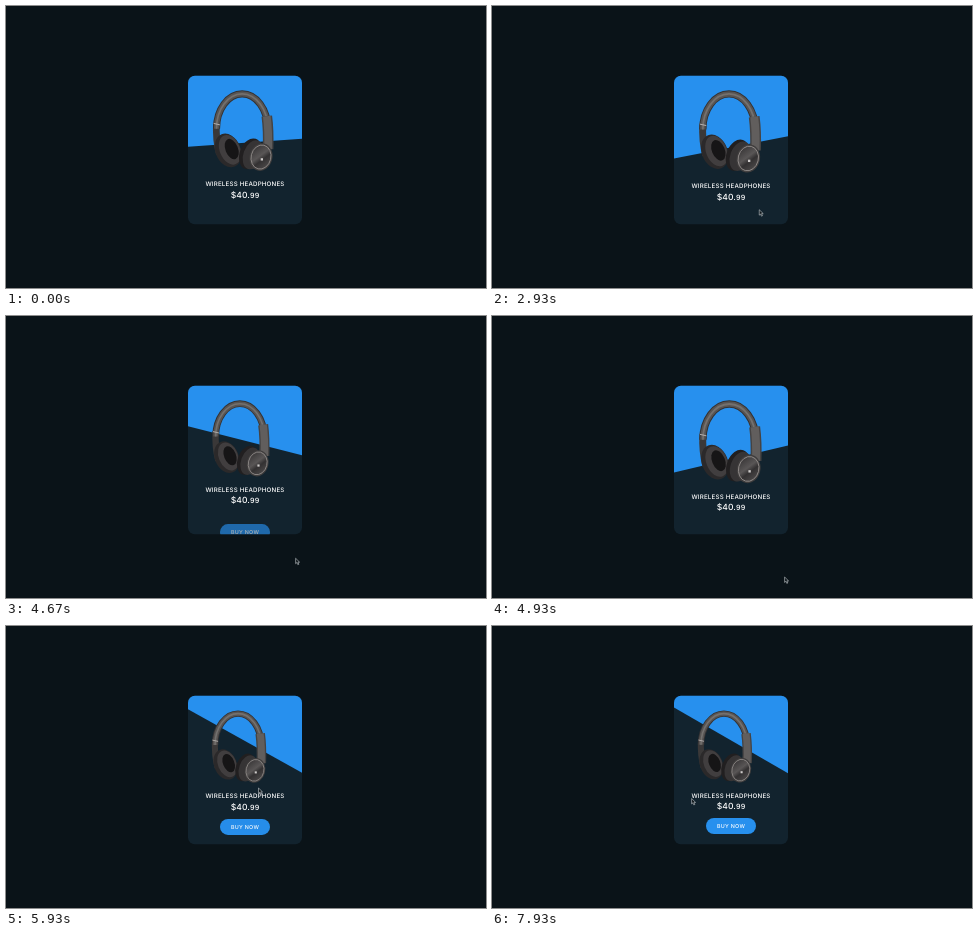
Animation, 480 px wide and 282 px high, one loop 8 s. Source, as an HTML page:

```html
<!DOCTYPE html>
<html lang="en">
<head>
<meta charset="utf-8">
<title>Product card</title>
<style>
  html, body { margin: 0; width: 100%; height: 100%; overflow: hidden; background: #0a1318; }
  svg { display: block; width: 100%; height: 100%; }
  text { font-family: Inter, "Open Sans", sans-serif; font-weight: 500; fill: #fff; text-anchor: middle; text-rendering: geometricPrecision; }
  .title { font-size: 6.2px; letter-spacing: .19px; }
  .price { font-size: 8.5px; letter-spacing: .1px; }
  .cents { font-size: 7.2px; }
  .label { font-size: 5.4px; letter-spacing: .27px; }
  .line { fill: none; }
</style>
</head>
<body>
<svg viewBox="0 0 480 282">
  <defs>
    <clipPath id="cardShape"><rect x="182" y="69.7" width="114" height="148.6" rx="7"/></clipPath>
    <linearGradient id="metal" x1="0" y1="0" x2="1" y2="1">
      <stop offset="0" stop-color="#2f2d2e"/>
      <stop offset=".45" stop-color="#595656"/>
      <stop offset=".6" stop-color="#333132"/>
      <stop offset="1" stop-color="#565353"/>
    </linearGradient>
    <path id="band" d="M211 124A26.5 36 0 0 1 264 124"/>
    <path id="slider" d="M263 111Q265 126 264.3 145"/>
  </defs>

  <g clip-path="url(#cardShape)">
    <rect x="182" y="69" width="114" height="150" fill="#12232e"/>
    <path id="wedge" fill="#2790ee"/>

    <g id="headphones">
      <g class="line">
        <path d="M211 118Q210 136 214 150" stroke="#3a3838" stroke-width="7"/>
        <use href="#band" stroke="#343233" stroke-width="7.4"/>
        <use href="#band" stroke="#575453" stroke-width="5.4"/>
        <use href="#band" stroke="#73706e" stroke-width="1.8"/>
        <use href="#slider" stroke="#454343" stroke-width="11"/>
        <use href="#slider" stroke="#615e5d" stroke-width="8"/>
        <path d="M208 118.5L214.5 120" stroke="#b5b1af"/>
      </g>
      <g transform="translate(223 146.5) rotate(-22)">
        <ellipse rx="13" ry="18" fill="#2b292a"/>
        <ellipse cx="2" rx="10.5" ry="16" fill="#413e3f"/>
        <ellipse cx="4" rx="6.5" ry="11" fill="#161516"/>
      </g>
      <g transform="translate(246 150) rotate(20)">
        <ellipse rx="11" ry="16.5" fill="#211f20"/>
        <ellipse cx="3" rx="10" ry="15.5" fill="#363435"/>
      </g>
      <g transform="translate(257 153.3) rotate(14)">
        <ellipse rx="11.8" ry="14.4" fill="#3f3d3d"/>
        <ellipse rx="10.2" ry="12.6" fill="url(#metal)" stroke="#918c8a" stroke-width=".9"/>
      </g>
      <rect x="256.7" y="154.5" width="2.4" height="2.4" fill="#cfcccb"/>
    </g>

    <g id="copy">
      <text class="title" x="239" y="183.2">WIRELESS HEADPHONES</text>
      <text class="price" x="239" y="194.7">$40.<tspan class="cents">99</tspan></text>
    </g>

    <g id="buy">
      <rect x="214" y="192" width="50" height="16" rx="8" fill="#2790ee"/>
      <text class="label" x="239" y="202">BUY NOW</text>
    </g>
  </g>

  <path id="cursor" d="M0 0V5.4L1.3 4.3L2.2 6.4L3.2 6L2.3 3.9H4Z" fill="#10181c" stroke="#d3d9dc" stroke-width=".55" stroke-linejoin="round"/>
</svg>

<script>
const LOOP = 8000, FPS = 15, HOVER_MS = 500;
const card = { left: 182, right: 296, top: 70, height: 148 };

// when the pointer leaves and enters the card, in turn
const toggles = [-228, 2885, 4555, 5525];

// the cursor rests between moves
const offstage = { x: 284, y: 290 };
const moves = [
  { from: 400, to: 670, x: 237.7, y: 266.5 },
  { from: 2330, to: 3170, x: 270, y: 188.7 },
  { from: 4200, to: 4900, x: 292.6, y: 261 },
  { from: 5230, to: 5930, x: 252.5, y: 162 },
  { from: 6330, to: 7000, x: 233, y: 199.5 },
  { from: 7480, to: 7930, x: 199.6, y: 172.5 }
];

const $ = id => document.getElementById(id);
const place = (id, transform) => $(id).setAttribute('transform', transform);
const mix = (a, b, k) => a + (b - a) * k;
const clamp = k => Math.min(1, Math.max(0, k));
const smooth = k => k * k * (3 - 2 * k);
const bezier = (a, b, u) => 3 * a * u * (1 - u) ** 2 + 3 * b * u * u * (1 - u) + u ** 3;

// CSS "ease": cubic-bezier(.25, .1, .25, 1)
function ease(x) {
  let lo = 0, hi = 1;
  for (let i = 0; i < 20; i++) {
    const mid = (lo + hi) / 2;
    if (bezier(.25, .25, mid) < x) lo = mid; else hi = mid;
  }
  return bezier(.1, 1, lo);
}

function hoverAt(t) {
  const i = toggles.findLastIndex(start => start <= t);
  const k = ease(clamp((t - toggles[i]) / HOVER_MS));
  return i % 2 ? k : 1 - k;
}

// x runs ahead of y, which bows each path slightly
function cursorAt(t) {
  let { x, y } = offstage;
  for (const move of moves) {
    const k = smooth(clamp((t - move.from) / (move.to - move.from)));
    x = mix(x, move.x, 1 - (1 - k) ** 1.5);
    y = mix(y, move.y, k);
  }
  return [x, y];
}

function render(t) {
  const p = hoverAt(t);
  const { left, right, top, height } = card;
  const middle = top + height * mix(.5, .3, p);
  const rise = Math.tan(mix(-15, 30, p) * Math.PI / 180) * (right - left) / 2;
  $('wedge').setAttribute('d', `M${left} 0H${right}V${middle + rise}L${left} ${middle - rise}Z`);

  place('headphones', `translate(196 85) scale(${mix(1, .866, p)}) translate(-196 -85)`);
  place('copy', `translate(0 ${-11.2 * p})`);
  place('buy', `translate(0 ${46 * (1 - p)})`);
  $('buy').setAttribute('opacity', p);
  place('cursor', `translate(${cursorAt(t)})`);
}

const begin = performance.now();
function tick() {
  const t = (performance.now() - begin) % LOOP;
  // the small lead absorbs rounding at step boundaries
  const step = Math.floor((t + 4) * FPS / 1000) % (LOOP * FPS / 1000);
  render(step * 1000 / FPS);
  requestAnimationFrame(tick);
}
tick();
</script>
</body>
</html>
```
